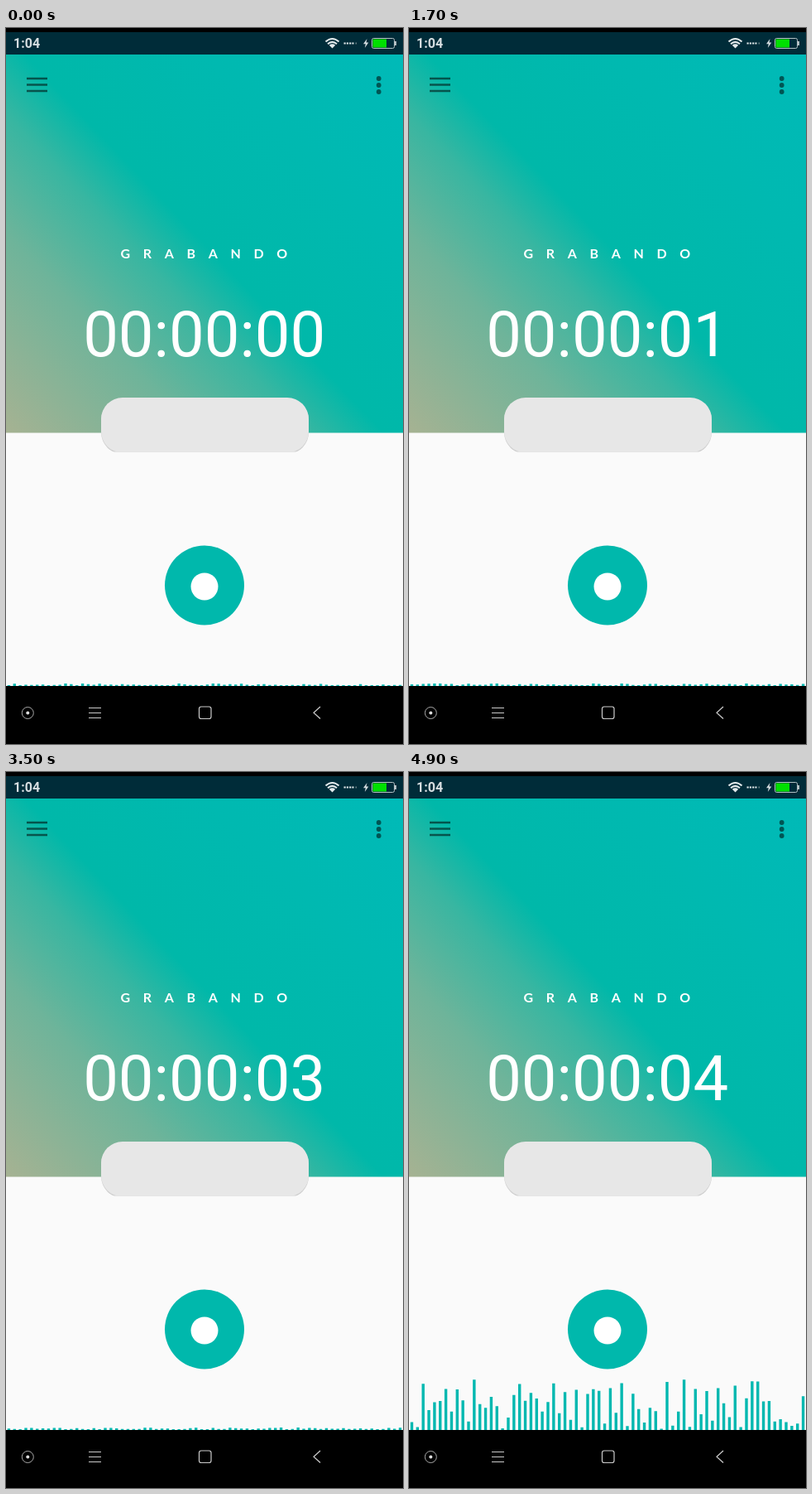
Animation of 480x864 px, one loop 5000 ms. Source, as an HTML page:

```html
<!DOCTYPE html>
<html lang="es">
<head>
<meta charset="utf-8">
<title>Grabadora</title>
<style>
  html, body { margin: 0; width: 100%; height: 100%; overflow: hidden; background: #000; }
  svg { display: block; width: 480px; height: 864px; }
  text { fill: #fff; font-family: Roboto, sans-serif; }
  .line { fill: none; stroke: #ccc; stroke-width: 1.2; }
</style>
</head>
<body>
<svg viewBox="0 0 480 864">
  <defs>
    <linearGradient id="sky" gradientUnits="userSpaceOnUse" x1="0" y1="489" x2="480" y2="32">
      <stop offset="0" stop-color="#a6b292"/>
      <stop offset=".25" stop-color="#6eb49a"/>
      <stop offset=".4" stop-color="#38b6a1"/>
      <stop offset=".5" stop-color="#00b8a9"/>
      <stop offset="1" stop-color="#00bab8"/>
    </linearGradient>
    <clipPath id="cut"><path d="M100 440H380V511.5H100Z"/></clipPath>
  </defs>

  <!-- status bar -->
  <path fill="#002c39" d="M0 5H480V32H0Z"/>
  <text x="9" y="24" font-size="16" font-weight="700" style="fill:#d6dde0">1:04</text>
  <g fill="none" stroke="#e4eaec" stroke-width="2">
    <path d="M386.5 16.5Q394.5 9.5 402.5 16.5M389 19.3Q394.5 14.5 400 19.3"/>
    <path fill="#e4eaec" stroke="none" d="M390.8 20.7Q394.5 18 398.2 20.7L394.5 24.5Z"/>
    <path d="M408.5 18.5H420.5" stroke-width="2.2" stroke-dasharray="2.2 1.1"/>
    <path d="M422.5 18.5H424" stroke="#6b8188"/>
  </g>
  <path fill="#d6dde0" d="M436.5 13L432 19.3H434.8L433.8 24L438.3 17.5H435.5Z"/>
  <rect x="442.5" y="12.5" width="27" height="12" rx="2" fill="none" stroke="#b5c0c4"/>
  <path fill="#00e000" d="M443.5 13.5H460V23.5H443.5Z"/>
  <path fill="#b5c0c4" d="M470 16H472V21H470Z"/>

  <!-- panel and header -->
  <path fill="#fafafa" d="M0 480H480V794H0Z"/>
  <path fill="url(#sky)" d="M0 32H480V488.6H0Z"/>
  <path stroke="#000" stroke-opacity=".54" stroke-width="2.6" d="M25 61H50M25 68.5H50M25 76H50"/>
  <g fill-opacity=".54">
    <circle cx="450.7" cy="61" r="2.9"/>
    <circle cx="450.7" cy="69" r="2.9"/>
    <circle cx="450.7" cy="77" r="2.9"/>
  </g>
  <text x="138.5" y="278" font-size="16" font-weight="700" letter-spacing="15.7" style="font-family:Lato,sans-serif">GRABANDO</text>
  <text id="clock" x="239.7" y="396" font-size="76" text-anchor="middle">00:00:00</text>
  <g clip-path="url(#cut)">
    <rect x="115" y="447" width="251" height="67" rx="26" fill="#cfcfcf"/>
    <rect x="115" y="446" width="251" height="66.5" rx="26" fill="#e7e7e7"/>
  </g>
  <circle cx="240" cy="672.5" r="48" fill="#00b8ac"/>
  <circle cx="240" cy="674" r="16.5" fill="#fff"/>
  <path id="bars" stroke="#00b8b0" stroke-width="3.4"/>

  <!-- navigation bar -->
  <circle class="line" cx="26.3" cy="826.5" r="7" style="stroke:#aaa;stroke-width:1"/>
  <circle cx="26.3" cy="826.5" r="2" fill="#ddd"/>
  <path class="line" d="M100 820.5H115M100 826.5H115M100 832.5H115"/>
  <rect class="line" x="233.5" y="819" width="14.5" height="14.5" rx="2.5"/>
  <path class="line" d="M380 819L372 826.3L380 833.5"/>
</svg>

<script>
const LOOP = 5000, STEP = 100, COUNT = 70, PITCH = 480 / COUNT, FLOOR = 794, PEAK = 60;
const clock = document.getElementById('clock');
const bars = document.getElementById('bars');

const clamp = v => Math.min(1, Math.max(0, v));

function random(i, n) {
  const v = Math.sin(i * 12.9898 + n * 78.233) * 43758.5453;
  return v - Math.floor(v);
}

// Loudness at a step: one burst that fades, then one that grows to the end.
function gain(n) {
  const first = clamp((n - 22) / 4) * clamp((33 - n) / 4);
  const second = clamp((n - 42) / 6);
  return first + second;
}

function height(i, n) {
  const r = random(i, n);
  return 1 + Math.max(2 * r * r, PEAK * r * gain(n));
}

function draw(now) {
  const t = now % LOOP, n = Math.floor(t / STEP);
  clock.textContent = '00:00:0' + Math.max(0, Math.floor((t - 200) / 1000));
  let d = '';
  for (let i = 0; i < COUNT; i++) {
    d += `M${(i + 0.5) * PITCH} ${FLOOR}v${-height(i, n)}`;
  }
  bars.setAttribute('d', d);
}

const start = performance.now();
function tick() {
  draw(performance.now() - start);
  requestAnimationFrame(tick);
}
tick();
</script>
</body>
</html>
```
